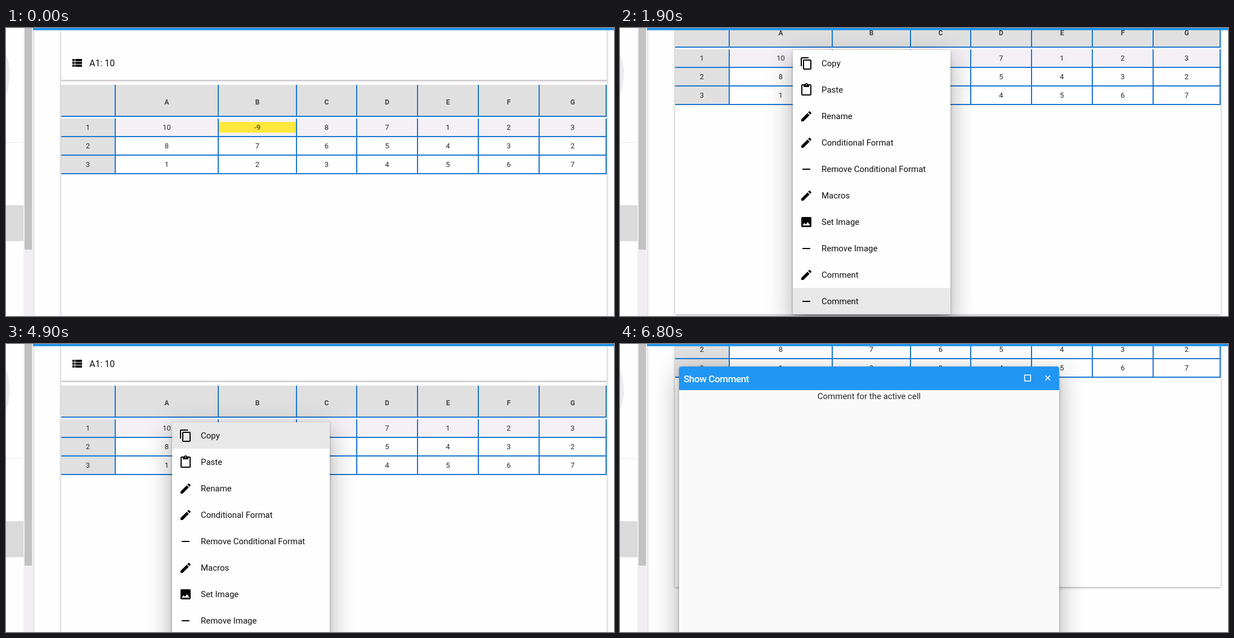
These frames come from a looping animation (1080 by 512 pixels, 8 s). An HTML page:

```html
<!DOCTYPE html>
<html lang="en">
<head>
<meta charset="utf-8">
<title>Sheet</title>
<style>
  html, body { margin: 0; width: 100%; height: 100%; overflow: hidden; background: #fefefe; }
  svg { display: block; width: 1080px; height: 512px; font-family: Roboto, sans-serif; }
  .cell { font-size: 13px; fill: #2b2b2b; text-anchor: middle; }
  .head { font-size: 12px; font-weight: 700; fill: #424242; text-anchor: middle; }
  .item { font-size: 15px; fill: #111; }
</style>
</head>
<body>
<svg id="stage" viewBox="0 0 1080 512" xmlns="http://www.w3.org/2000/svg"></svg>
<script>
const LOOP = 8000, ITEM = 47;
const BLUE = '#1976d2', GREY = '#e0e0e0';
const ACTIVE = '#f4f0f5', HOVER = '#c2e2fa';

const edges = [98, 194, 377, 516, 623, 731, 839, 947, 1066];
const heads = ['', 'A', 'B', 'C', 'D', 'E', 'F', 'G'];
const rows = [
  [1, 10, -9, 8, 7, 1, 2, 3],
  [2, 8, 7, 6, 5, 4, 3, 2],
  [3, 1, 2, 3, 4, 5, 6, 7]
];
const icons = {
  copy: 'M19 21H8V7h11m0-2H8a2 2 0 0 0-2 2v14a2 2 0 0 0 2 2h11a2 2 0 0 0 2-2V7a2 2 0 0 0-2-2m-3-4H4a2 2 0 0 0-2 2v14h2V3h12z',
  paste: 'M19 20H5V4h2v3h10V4h2m-7-2a1 1 0 0 1 1 1 1 1 0 0 1-1 1 1 1 0 0 1-1-1 1 1 0 0 1 1-1m7 0h-4.18C14.4.84 13.3 0 12 0S9.6.84 9.18 2H5a2 2 0 0 0-2 2v16a2 2 0 0 0 2 2h14a2 2 0 0 0 2-2V4a2 2 0 0 0-2-2z',
  pencil: 'M20.71 7.04c.39-.39.39-1.04 0-1.41l-2.34-2.34c-.37-.39-1.02-.39-1.41 0l-1.84 1.83 3.75 3.75M3 17.25V21h3.75L17.81 9.93l-3.75-3.75z',
  minus: 'M19 13H5v-2h14z',
  image: 'M8.5 13.5l2.5 3 3.5-4.5 4.5 6H5m16 1V5a2 2 0 0 0-2-2H5a2 2 0 0 0-2 2v14a2 2 0 0 0 2 2h14a2 2 0 0 0 2-2z',
  list: 'M9 5v4h12V5M9 19h12v-4H9m0-1h12v-4H9M4 9h4V5H4m0 14h4v-4H4m0-1h4v-4H4z'
};
const items = [
  ['copy', 'Copy'], ['paste', 'Paste'], ['pencil', 'Rename'],
  ['pencil', 'Conditional Format'], ['minus', 'Remove Conditional Format'],
  ['pencil', 'Macros'], ['image', 'Set Image'], ['minus', 'Remove Image'],
  ['pencil', 'Comment'], ['minus', 'Comment']
];

// Menus: time range, left edge, top within the page
const menus = [
  { from: 900, to: 2400, x: 307, y: 162 },
  { from: 4900, to: 5900, x: 295, y: 166 }
];
// [time, value]: each value holds until the next one
const scroll = [[0, 0], [900, 23], [1500, 50], [1600, 85], [1700, 123], [3000, 110], [3100, 62],
  [3200, 23], [4900, 27], [5300, 60], [5400, 104], [5500, 125], [5600, 127], [5700, 170], [5800, 200]];
const mouse = [[0, 150], [1100, 210], [1200, 300], [1300, 350], [1400, 365], [1500, 372], [1600, 375],
  [1700, 395], [1800, 438], [1900, 485], [4900, 155], [5000, 210], [5200, 340], [5300, 400], [5400, 415]];
const rowHover = [[0, -1], [100, 1], [300, 0], [900, -1], [3500, 2], [3600, 1], [3800, 0], [4900, -1]];

const svg = document.getElementById('stage');

function el(parent, tag, attrs, text) {
  const node = document.createElementNS(svg.namespaceURI, tag);
  for (const k in attrs) node.setAttribute(k, attrs[k]);
  if (text !== undefined) node.textContent = text;
  return parent.appendChild(node);
}
const group = parent => el(parent, 'g', {});
const rect = (parent, x, y, width, height, fill, more) =>
  el(parent, 'rect', { x, y, width, height, fill, ...more });
const label = (parent, x, y, text, cls) => el(parent, 'text', { x, y, class: cls }, text);
const icon = (parent, name, x, y) =>
  el(parent, 'path', { d: icons[name], transform: `translate(${x} ${y})`, 'fill-rule': 'evenodd' });

function shadow(parent, x, y, w, h) {
  for (const [grow, dy, blur, alpha] of [[3, 24, 19, .14], [8, 9, 23, .12], [-7, 11, 7.5, .2], [0, 1, 2, .25]]) {
    rect(parent, x - grow, y - grow + dy, w + 2 * grow, h + 2 * grow, '#000',
      { opacity: alpha, style: `filter: blur(${blur}px)` });
  }
}

function buildSidebar() {
  rect(svg, 0, 0, 32, 512, '#fefefe');
  el(svg, 'circle', { cx: -89, cy: 82, r: 96, fill: '#ececec' });
  rect(svg, 0, 203, 31, 1, '#e8e8e8');
  rect(svg, 0, 315, 31, 64, '#dadada');
  rect(svg, 31, 0, 17, 512, '#f0eef2');
  rect(svg, 33, 0, 13, 394, '#c1c1c1');
  rect(svg, 48, 0, 2, 512, '#e9e5ea');
  rect(svg, 50, 0, 2, 512, '#f6f4f6');
}

function buildPage() {
  const page = group(svg);
  rect(page, 98, -20, 969, 652, '#fefefe',
    { style: 'filter: drop-shadow(0 1px 2px rgba(0,0,0,.38))' });
  icon(page, 'list', 114, 50);
  el(page, 'text', { x: 148, y: 68, 'font-size': 16, fill: '#111' }, 'A1: 10');
  rect(page, 98, 92, 969, 3, '#d6d0d5');

  rect(page, 98, 101, 969, 55, GREY);
  const bands = rows.map((row, r) => rect(page, 195, 161 + 33 * r, 871, 31, 'none'));
  rect(page, 98, 161, 96, 98, GREY);
  rect(page, 378, 167, 138, 19, '#ffe83b');
  for (const y of [156, 192, 225, 258]) rect(page, 98, y, 969, 2, BLUE);
  for (const x of edges.slice(1)) {
    rect(page, x - 1, 101, 2, 57, BLUE);
    rect(page, x - 1, 161, 2, 99, BLUE);
  }
  heads.forEach((text, c) => {
    const x = (edges[c] + edges[c + 1]) / 2 - (c ? 0 : .5);
    label(page, x, 136, text, 'head');
    rows.forEach((row, r) => label(page, x, 181 + 33 * r, row[c], 'cell'));
  });
  return { page, bands };
}

function buildMenu() {
  const menu = group(svg), h = ITEM * items.length;
  shadow(menu, 0, 0, 280, h);
  rect(menu, 0, 0, 280, h, '#fefefe', { rx: 2 });
  const mark = rect(menu, 0, 0, 280, ITEM, '#e8e8e8');
  items.forEach(([name, text], i) => {
    const mid = ITEM * i + 24;
    icon(menu, name, 12, mid - 12);
    label(menu, 51, mid + 5, text, 'item');
  });
  return { menu, mark };
}

function buildDialog() {
  const box = group(svg);
  shadow(box, 105, 40, 675, 560);
  rect(box, 105, 40, 675, 560, '#f9f9f9', { rx: 4 });
  el(box, 'path', { d: 'M105 82V44a4 4 0 0 1 4-4h667a4 4 0 0 1 4 4v38z', fill: '#2196f3' });
  el(box, 'text', { x: 113, y: 68, fill: '#fff', 'font-size': 17, 'font-weight': 500, 'letter-spacing': -.4 },
    'Show Comment');
  el(box, 'path', {
    d: 'M718.7 55.2h10.6v10.6h-10.6zM755.5 56l8.5 8.5m0-8.5l-8.5 8.5',
    fill: 'none', stroke: '#fff', 'stroke-width': 1.6
  });
  el(box, 'text', { x: 442.5, y: 98, fill: '#2b2b2b', 'font-size': 15, 'text-anchor': 'middle' },
    'Comment for the active cell');
  return box;
}

buildSidebar();
const { page, bands } = buildPage();
rect(svg, 48, 0, 1032, 4, '#2196f3');
const { menu, mark } = buildMenu();
const dialog = buildDialog();

function at(track, t) {
  let value = track[0][1];
  for (const [time, v] of track) if (time <= t) value = v;
  return value;
}
const show = (node, on) => node.setAttribute('display', on ? 'inline' : 'none');

function draw(t) {
  const top = at(scroll, t), hovered = at(rowHover, t);
  page.setAttribute('transform', `translate(0 ${-top})`);
  bands.forEach((band, r) =>
    band.setAttribute('fill', r === hovered ? HOVER : r === 0 ? ACTIVE : 'none'));

  const open = menus.find(m => t >= m.from && t < m.to);
  show(menu, open);
  if (open) {
    const y = open.y - top;
    menu.setAttribute('transform', `translate(${open.x} ${y})`);
    mark.setAttribute('y', ITEM * Math.floor((at(mouse, t) - y) / ITEM));
  }
  show(dialog, t >= 6800);
}

const start = performance.now();
function tick() {
  draw((performance.now() - start) % LOOP);
  requestAnimationFrame(tick);
}
tick();
</script>
</body>
</html>
```
